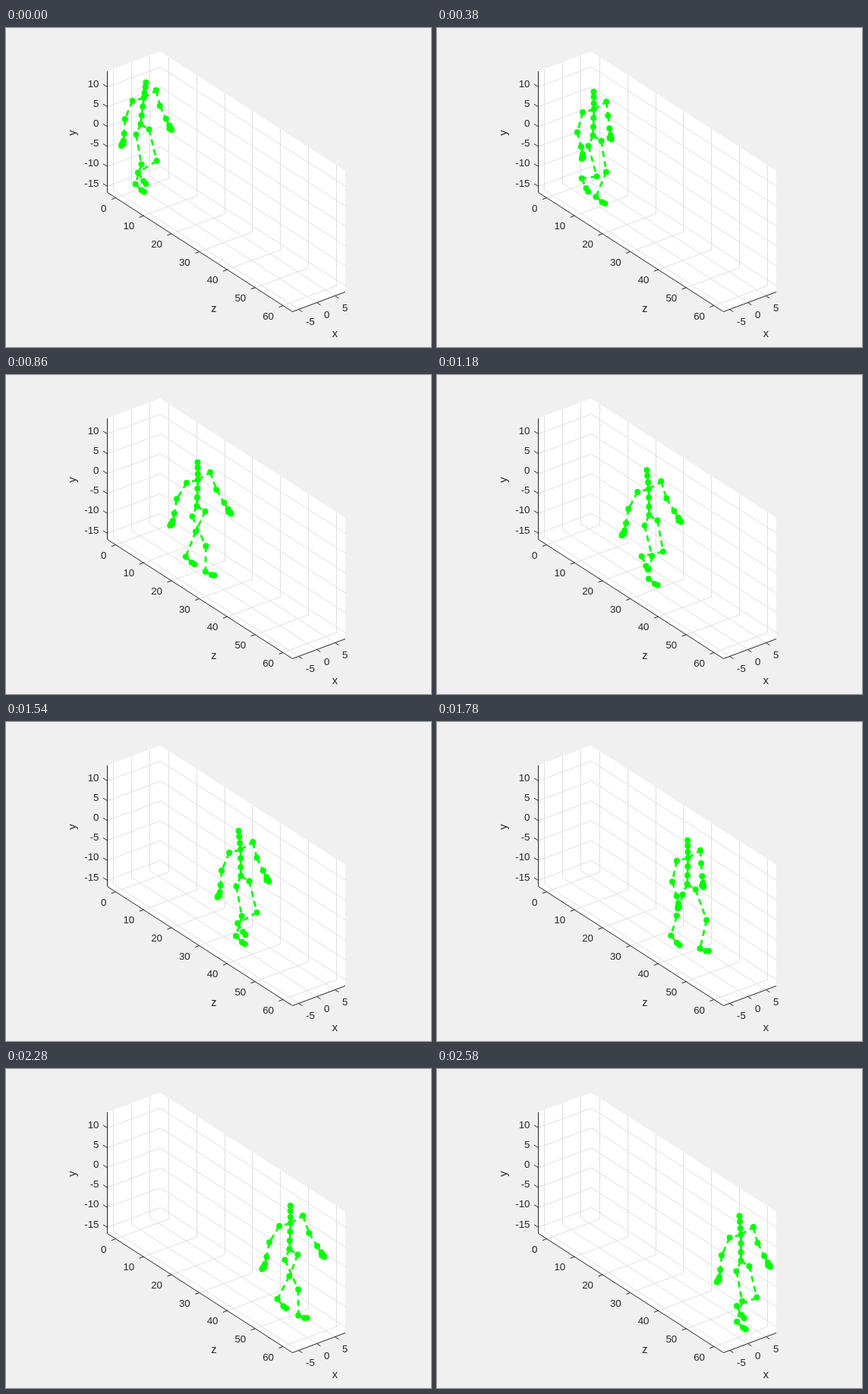
Write an HTML page that moves like this. It is 560 by 420 pixels and loops after 2.6 s.

```html
<!DOCTYPE html>
<html lang="en">
<head>
<meta charset="utf-8">
<title>Walking figure</title>
<style>
html, body { margin: 0; width: 100%; height: 100%; overflow: hidden; background: #f0f0f0; }
svg { display: block; width: 560px; height: 420px; }
text { font: 13.33px "Liberation Sans", Arial, sans-serif; fill: #262626; }
.name { font-size: 14.67px; text-anchor: middle; }
.end { text-anchor: end; }
path { fill: none; }
#grid { stroke: #dfdfdf; }
#axes { stroke: #262626; }
#bones { stroke: #0f0; stroke-width: 2.7; stroke-dasharray: 8 5.5; }
#joints { stroke: #0f0; stroke-width: 8; stroke-linecap: round; }
</style>
</head>
<body>
<svg viewBox="0 0 560 420">
  <polygon points="133,57 203,31 447,188 447,347 377,373 133,216" fill="#fff"/>
  <path id="grid"/>
  <path id="axes"/>
  <g id="labels"></g>
  <text class="name" x="433.5" y="407">x</text>
  <text class="name" x="274" y="374">z</text>
  <text class="name" transform="translate(92 138) rotate(-90)">y</text>
  <g transform="translate(.5 .5)">
    <path id="bones"/>
    <path id="joints"/>
  </g>
</svg>
<script>
const $ = id => document.getElementById(id);
const LOOP = 2600, STEP = 20, TURN = 2 * Math.PI;

// Axes box: pixel vectors for the full x and z edges
const X = [70, -26], Z = [244, 157];
let grid = '', axes = 'M133.5 57V216.5L377.5 373.5L447 347.5', labels = '';
const line = (x, y, ...ds) =>
  `M${x} ${y}` + ds.map(d => `l${d[0]} ${d[1]}`).join('');
const upright = (x, y) => `M${Math.floor(x) + 0.5} ${y}v-159`;
const label = (s, x, y, cls = '') =>
  `<text class="${cls}" x="${x}" y="${Math.round(y)}">${s}</text>`;

for (let i = 0; i < 6; i++) {
  const y = 77.5 + 26.2 * i;
  grid += line(133.5, y, X, Z);
  axes += line(133.5, y, [-5.5, -3.5]);
  labels += label(10 - 5 * i, 122.5, y, 'end');
}
for (let i = 0; i < 7; i++) {
  const x = 144.5 + 36.75 * i, y = 223.6 + 23.65 * i;
  grid += line(x, y, X) + upright(x + X[0], y + X[1]);
  axes += line(x, y, [-5.5, 2]);
  labels += label(10 * i, x - 12, y + 18, 'end');
}
for (let i = 0; i < 3; i++) {
  const x = 385.4 + 24 * i, y = 370.3 - 8.9 * i;
  grid += line(x, y, [-Z[0], -Z[1]]) + upright(x - Z[0], y - Z[1]);
  axes += line(x, y, [5, 3.3]);
  labels += label(5 * i - 5, x + 9.7, y + 20.8);
}
$('grid').setAttribute('d', grid);
$('axes').setAttribute('d', axes);
$('labels').innerHTML = labels;

// Key points of the walk: time, pelvis x and y, strides taken, lean of the head
const walk = [
  [0, 177, 126, 0.23, 7],
  [380, 205, 141, 0.64, 1],
  [860, 251, 172, 0.97, 1],
  [1180, 279, 184, 1.13, -3],
  [1540, 309, 202, 1.22, -3],
  [2000, 348, 223, 1.8, 3],
  [2580, 400, 252, 2.2, -2]
];
// Leg angles in degrees at eighths of a stride, starting at heel strike
const thigh = [38, 18, 9, -13, -25, 18, 26, 30];
const shin = [-6, -16, -25, -18, -20, -60, -43, -20];
const foot = [104, 88, 80, 90, 76, 45, 65, 75];

// Cubic from p to q with end slopes m and n
function cubic(p, q, m, n, u) {
  const w = u * u * (3 - 2 * u);
  return p + (q - p) * w + u * (1 - u) * ((1 - u) * m - u * n);
}

function walkAt(t) {
  const last = walk.length - 1;
  let i = 0;
  while (i < last - 1 && t >= walk[i + 1][0]) i++;
  const a = walk[i], b = walk[i + 1], h = b[0] - a[0];
  const before = walk[Math.max(i - 1, 0)], after = walk[Math.min(i + 2, last)];
  const slope = (p, q, j) => (q[j] - p[j]) / (q[0] - p[0]) * h;
  return a.map((v, j) => j &&
    cubic(v, b[j], slope(before, b, j), slope(a, after, j), (t - a[0]) / h));
}

function cycle(keys, stride) {
  const n = keys.length, s = stride * n, i = Math.floor(s);
  const at = k => keys[(k + n) % n];
  return cubic(at(i), at(i + 1), (at(i + 1) - at(i - 1)) / 2,
    (at(i + 2) - at(i)) / 2, s - i);
}

const add = (p, x, y) => [p[0] + x, p[1] + y];
const mix = (p, q, k) => [p[0] + (q[0] - p[0]) * k, p[1] + (q[1] - p[1]) * k];
const xy = p => p[0].toFixed(2) + ' ' + p[1].toFixed(2);

// End of a bone that swings forward from hanging straight down
function swing(p, length, degrees, aside = 0) {
  const a = degrees * Math.PI / 180;
  const forward = length * Math.sin(a), down = length * Math.cos(a);
  return add(p, 3.66 * forward + 4.8 * aside, 2.35 * forward + 5.26 * down - 1.8 * aside);
}

function draw(t) {
  let bones = '', joints = '';
  const chain = (...pts) => pts.forEach((p, i) => {
    if (i) bones += `M${xy(pts[i - 1])}L${xy(p)}`;
    joints += `M${xy(p)}h.01`;
  });
  const [, x, y, stride, lean] = walkAt(t);
  const root = [x, y];
  const chest = add(root, 0.9 + 0.45 * lean, -34.4);
  const head = add(root, lean, -58 + 0.45 * lean);
  chain(root, mix(root, chest, 0.33), mix(root, chest, 0.67), chest,
    mix(chest, head, 0.34), mix(chest, head, 0.7), head);

  for (const side of [-1, 1]) {
    // Each arm swings against the leg of its own side
    const upper = side * Math.cos(TURN * stride);
    const lower = side * Math.cos(TURN * (stride - 0.05));
    const shoulder = add(chest, 0.75 + 15.55 * side, -3.1 - 6.9 * side);
    const elbow = add(shoulder, -2.5 + 7 * side + 3.6 * upper, 22.2 - 2.2 * side + 3 * upper);
    const fx = 3.5 + 2.5 * side + 4.8 * lower, fy = 18 - side;
    const wrist = add(elbow, fx, fy);
    const tip = add(wrist, 0.79 * fx - 1 + 2 * side, 0.79 * fy + 1);
    const palm = add(mix(wrist, tip, 0.6), 0.7 - 0.7 * side, 0);
    chain(chest, shoulder, elbow, wrist, palm, mix(palm, tip, 0.65), tip);
    chain(palm, add(mix(wrist, tip, 0.87), -2 * side, 0));

    const phase = (stride + (side > 0 ? 0.5 : 0)) % 1;
    const hip = add(root, 2.5 + 8.5 * side, 10.4 - 3.4 * side);
    const knee = swing(hip, 7.1, cycle(thigh, phase), 0.1 - 0.3 * side);
    const ankle = swing(knee, 7.1, cycle(shin, phase), -0.3 - 0.9 * side);
    const toe = swing(ankle, 3.25, cycle(foot, phase));
    chain(root, hip, knee, ankle, add(mix(ankle, toe, 0.68), 0, 1), toe);
  }
  $('bones').setAttribute('d', bones);
  $('joints').setAttribute('d', joints);
}

function tick() {
  draw(Math.floor(performance.now() % LOOP / STEP) * STEP);
  requestAnimationFrame(tick);
}
tick();
</script>
</body>
</html>
```
